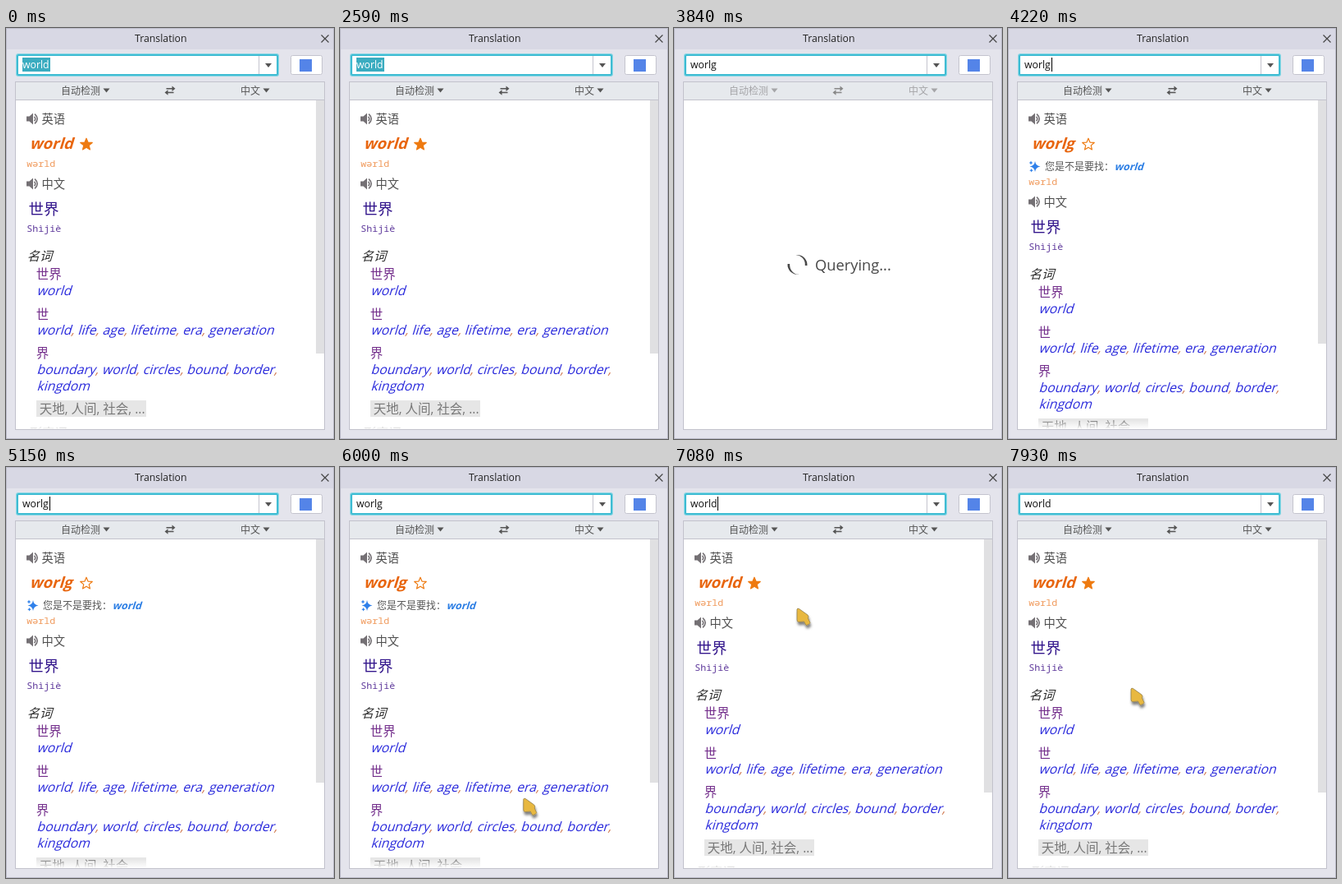
Write an HTML page that moves like this. It is 400 by 500 pixels and loops after 8 s.

```html
<!DOCTYPE html>
<html lang="zh-CN">
<head>
<meta charset="utf-8">
<title>Translation</title>
<style>
html, body { margin: 0; width: 100%; height: 100%; overflow: hidden; background: #e4e4ec; }
svg { display: block; width: 400px; height: 500px; font-family: "Open Sans", "Noto Sans CJK SC", "Noto Sans CJK", sans-serif; }
text { white-space: pre; }
.ui { font-size: 12.3px; fill: #222; }
.lang { font-size: 14.3px; fill: #505050; }
.head { font-size: 18.5px; font-weight: 700; fill: #e8650d; }
.mono { font: 500 11.67px "Noto Sans Mono", "DejaVu Sans Mono", monospace; }
.item { font-size: 15.5px; fill: #742f8c; }
.list { font-size: 15.8px; fill: #2b2bdc; }
.comma { fill: #d07a50; }
.pos { font-size: 15.3px; fill: #2c2c2c; }
.link { font-size: 12.3px; font-weight: 700; }
#header { font-size: 12px; fill: #555; }
#header.busy { fill: #a5a5a8; }
</style>
</head>
<body>
<svg viewBox="0 0 400 500">
  <defs>
    <clipPath id="view"><rect x="12" y="88" width="366" height="400"/></clipPath>
    <linearGradient id="fade" x1="0" y1="0" x2="0" y2="1">
      <stop offset="0" stop-color="#fff" stop-opacity="0"/>
      <stop offset="1" stop-color="#fff"/>
    </linearGradient>
    <filter id="shadow" x="-50%" y="-50%" width="200%" height="200%">
      <feDropShadow dx="1" dy="3.5" stdDeviation="1.6" flood-opacity=".5"/>
    </filter>
    <g id="speaker">
      <path d="M0 4h3.500L8 0V14L3.500 10H0Z" fill="#747074"/>
      <path d="M9.500 4.200q2.500 2.800 0 5.600M10 1.200q6.500 5.800 0 11.600" fill="none" stroke="#747074" stroke-width="1.6"/>
    </g>
    <path id="down" d="M-4 -2.500H4L0 2.500Z"/>
    <path id="crescent" d="M-12 -1A12 12 0 0 0 2 11.800A11.600 11.600 0 0 1 -9.300 -1Z" fill="#484848"/>
  </defs>

  <rect width="400" height="500" fill="#e4e4ec"/>
  <rect width="400" height="26" fill="#d8d8e4"/>
  <rect x=".5" y=".5" width="399" height="499" fill="none" stroke="#bcbcca"/>
  <text class="ui" x="157" y="17.300">Translation</text>
  <path d="M384.500 8.500l9 9m0-9l-9 9" stroke="#444" stroke-width="1.2"/>

  <rect x="12" y="31" width="321" height="28" rx="3" fill="#86d6e4"/>
  <rect x="14" y="33" width="317" height="24" rx="1.500" fill="#fff" stroke="#3fbcd3" stroke-width="2"/>
  <path d="M308.500 34V56" stroke="#c4c4ce"/>
  <use href="#down" x="320" y="45.500" fill="#555"/>
  <rect id="selection" x="20" y="36" width="34" height="17" fill="#3aacc0"/>
  <text id="input" class="ui" x="20" y="48.500"></text>
  <rect id="caret" y="36" width="1" height="17" fill="#000"/>

  <rect x="347.500" y="33.500" width="38" height="23" rx="2" fill="#fff" stroke="#c4c4ce"/>
  <rect x="358" y="38" width="15" height="15" fill="#5484e8"/>

  <rect x="11.500" y="65.500" width="377" height="423" fill="#fff" stroke="#c2c2cc"/>
  <path d="M12 66H388V87H12Z" fill="#e6e9ed"/>
  <path d="M12 87.500H388" stroke="#c2c2cc"/>
  <g id="header">
    <text x="67" y="80.500">自动检测</text>
    <use href="#down" x="122.500" y="76"/>
    <path id="swap" d="M195.500 73H202.500V70.500L206.500 73.800L202.500 77V74.500H195.500ZM204.500 79.300H197.500V81.800L193.500 78.500L197.500 75.300V77.800H204.500Z"/>
    <text x="286" y="80.500">中文</text>
    <use href="#down" x="317.500" y="76"/>
  </g>

  <g id="query">
    <g id="spinner"><use href="#crescent"/><use href="#crescent" transform="rotate(180)"/></g>
    <text x="172" y="294.500" font-size="18.3" fill="#484848">Querying...</text>
  </g>

  <g id="result">
    <g clip-path="url(#view)">
      <use href="#speaker" x="25" y="103.500"/>
      <text class="lang" x="43.500" y="116.200">英语</text>
      <g id="title"></g>
      <path id="star" stroke="#ee7a10" stroke-width="1.2" stroke-linejoin="round"/>
      <g id="suggest">
        <path d="M33 162q.8 5.700 6.500 6.500q-5.700 .8-6.500 6.500q-.8-5.700-6.500-6.500q5.700-.8 6.500-6.500ZM28 161.500q.4 2.100 2.500 2.500q-2.100 .4-2.500 2.500q-.4-2.100-2.500-2.500q2.100-.4 2.500-2.500ZM28.500 171q.3 2 2.300 2.300q-2 .3-2.300 2.300q-.3-2-2.300-2.300q2-.3 2.300-2.300Z" fill="#2f80ea"/>
        <text x="45" y="173" font-size="12" fill="#555">您是不是要找：</text>
      </g>
      <g id="below">
        <text class="mono" x="25.300" y="169" fill="#f09a5c">wərld</text>
        <use href="#speaker" x="25" y="182.500"/>
        <text class="lang" x="43.500" y="195.200">中文</text>
        <text x="27.500" y="226.700" font-size="18.5" fill="#33168c">世界</text>
        <text class="mono" x="25.300" y="248" fill="#5f3a9c">Shìjiè</text>
        <text class="item" x="36.800" y="305">世界</text>
        <text class="item" x="36.800" y="353.500">世</text>
        <text class="item" x="36.800" y="401">界</text>
        <rect x="37" y="453" width="134" height="20" fill="#e6e6e6"/>
        <text x="40.700" y="469.200" font-size="15.5" fill="#787878">天地, 人间, 社会, ...</text>
      </g>
      <rect x="12" y="477" width="366" height="11" fill="url(#fade)"/>
    </g>
    <rect id="scrollbar" x="378" y="88" width="10" fill="#e0e0e2"/>
  </g>

  <g id="cursor" filter="url(#shadow)" fill="#e8b840" stroke="#94804f" stroke-width=".8" stroke-linejoin="round">
    <path id="arrow" d="M0 1Q.5 -.5 2.500 .5L13 8Q15 10 13.500 12L16 17.500Q15 20 11 20.500L8.500 16L2 16.500Q0 16.500 0 14Z"/>
    <path id="hand" d="M-1 2Q0 -1.500 3 .8L7 7Q9 4.800 11 7Q13.500 5.800 14.500 8.500Q17 8.500 17 12L17.500 18Q17 22.500 12 23L6 23Q1 20 -2 13Q-2 10.500 2.500 12.500ZM7 7l1.500 4M11 7l1 4M14.500 8.500l.5 3"/>
  </g>
</svg>
<script>
const LOOP = 8000, STEP = 77;
const caretToggles = [70, 550, 1090, 1550, 2020, 2590, 2670, 3670, 4220, 4600,
  5150, 5610, 6150, 6610, 6920, 7540];
const $ = id => document.getElementById(id);
const show = (id, on) => $(id).setAttribute('display', on ? 'inline' : 'none');

function slant(parent, cls, x, y, words) {
  const text = document.createElementNS('http://www.w3.org/2000/svg', 'text');
  text.setAttribute('class', cls);
  text.setAttribute('transform', `translate(${x} ${y}) skewX(-17)`);
  text.innerHTML = words.replace(/,/g, '<tspan class="comma">,</tspan>');
  $(parent).append(text);
  return text;
}

const title = slant('title', 'head', 28.500, 147, 'world');
const link = slant('suggest', 'link', 129.500, 172.800, 'world');
slant('below', 'pos', 25.500, 283.300, '名词');
slant('below', 'list', 37.200, 325, 'world');
slant('below', 'list', 37.200, 373, 'world, life, age, lifetime, era, generation');
slant('below', 'list', 37.200, 421, 'boundary, world, circles, bound, border,');
slant('below', 'list', 37.200, 441, 'kingdom');
slant('below', 'pos', 25.500, 498, '形容词');

const starPoints = Array.from({ length: 10 }, (_, i) => {
  const r = i % 2 ? 3.4 : 7.6, a = i * Math.PI / 5;
  return `${98 + r * Math.sin(a)} ${141.8 - r * Math.cos(a)}`;
});
$('star').setAttribute('d', `M${starPoints.join('L')}Z`);

function inputAt(t) {
  if (t < 2830 || t >= 7080) return 'world';
  return t < 3000 ? 'worl' : 'worlg';
}

function cursorAt(t) {
  if (t >= 7780) {
    const p = Math.min(1, (Math.floor((t - 7780) / 75) + 1) / 3);
    return [150, 172 + 97 * p * p * (1.6 - .6 * p)];
  }
  if (t >= 7080) return [150, 172];
  // Stepped, eased move along a quadratic curve up to the link.
  const p = Math.min(1, Math.floor((t - 5840) / STEP) / 6);
  const e = p * p * (3 - 2 * p), q = 1 - e;
  return [q * q * 234 + 2 * q * e * 222 + e * e * 150,
          q * q * 496 + 2 * q * e * 310 + e * e * 176];
}

function render(t) {
  const word = inputAt(t), selected = t < 2670;
  const busy = t >= 3840 && t < 4150;
  const misspelt = t >= 4150 && t < 7080;
  const hover = t >= 6300 && t < 7080;

  $('input').textContent = word;
  $('input').style.fill = selected ? '#fff' : '#111';
  show('selection', selected);
  show('caret', caretToggles.filter(at => at <= t).length % 2);
  $('caret').setAttribute('x', word === 'worl' ? 45 : 53);

  $('header').setAttribute('class', busy ? 'busy' : '');
  $('swap').setAttribute('fill', busy ? '#888' : '#555');
  show('query', busy);
  show('result', !busy);
  const turn = Math.floor((t - 3840) / STEP) * 36;
  $('spinner').setAttribute('transform', `translate(150.500 288) rotate(${turn})`);

  title.textContent = misspelt ? 'worlg' : 'world';
  $('star').setAttribute('fill', misspelt ? '#fff' : '#ee7a10');
  show('suggest', misspelt);
  link.setAttribute('fill', hover && t < 6920 ? '#16a2b4' : '#2a7de4');
  $('below').setAttribute('transform', `translate(0 ${misspelt ? 22 : 0})`);
  $('scrollbar').setAttribute('height', misspelt ? 296 : 308);

  show('cursor', t >= 5840);
  show('hand', hover);
  show('arrow', !hover);
  $('cursor').setAttribute('transform', `translate(${cursorAt(t).join(' ')})`);
}

const start = performance.now();
function frame() {
  render((performance.now() - start) % LOOP);
  requestAnimationFrame(frame);
}
frame();
</script>
</body>
</html>
```
